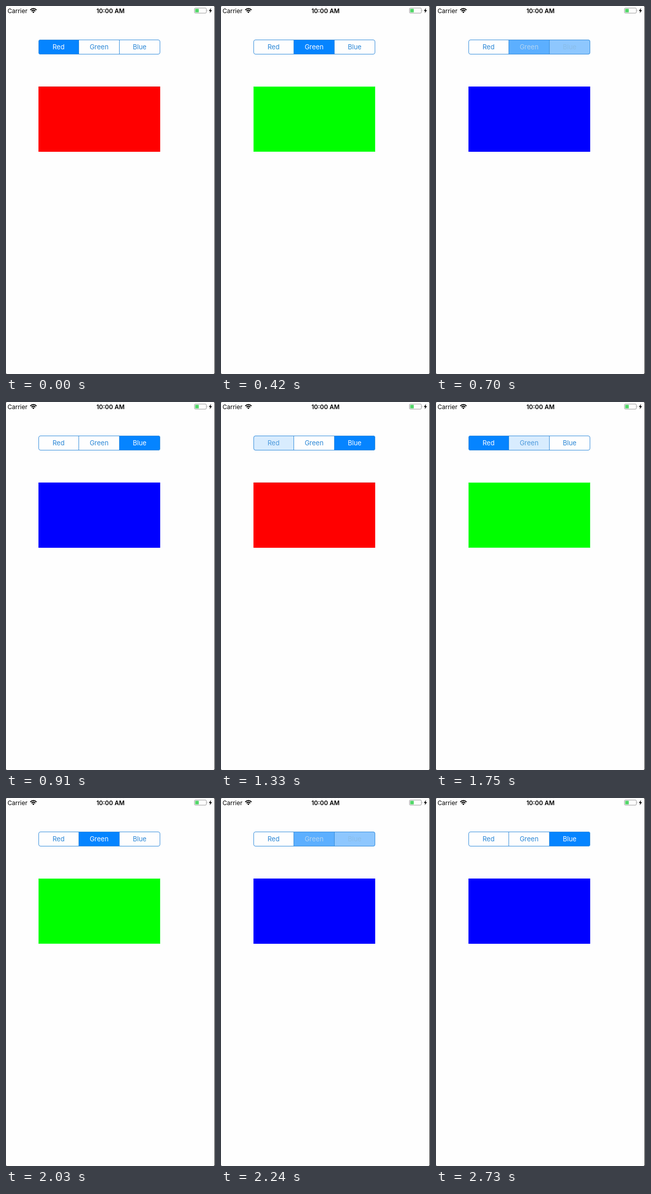
An HTML page that plays this animation: 412x722 px, repeating every 3.01 s.

```html
<!DOCTYPE html>
<html lang="en">
<head>
<meta charset="utf-8">
<title>Segmented control</title>
<style>
  html, body { margin: 0; width: 100%; height: 100%; overflow: hidden; background: #222; }
  svg { display: block; width: 100%; height: 100%; }
  text { font-family: Inter, "Liberation Sans", sans-serif; font-size: 12px; }
  .label { font-size: 13px; text-anchor: middle; }
</style>
</head>
<body>
<svg viewBox="0 0 412 722">
  <clipPath id="rounded"><rect x="64" y="66" width="240" height="29" rx="4"/></clipPath>
  <rect width="411" height="722" rx="2" fill="#fefefe"/>

  <!-- Status bar -->
  <text x="3" y="14">Carrier</text>
  <g fill="none" stroke="#000" stroke-width="2">
    <path d="M47.8 7.7Q54 2.3 60.2 7.7M50.2 10Q54 6.8 57.8 10"/>
  </g>
  <path d="M51.7 11.6Q54 9.8 56.3 11.6L54 14Z"/>
  <text x="206" y="14" text-anchor="middle" font-weight="600">10:00 AM</text>
  <rect x="371.5" y="4" width="23.5" height="10" rx="2" fill="none" stroke="#999"/>
  <path d="M396 7.3q1.6 1.7 0 3.4z" fill="#999"/>
  <rect x="373" y="5.5" width="7" height="7" rx=".6" fill="#53d769"/>
  <path d="M404.3 4L399.8 9.8H402.6L401.5 14L406.2 8.2H403.3Z"/>

  <!-- Segmented control -->
  <g id="segments" clip-path="url(#rounded)"></g>
  <g fill="none" stroke="#368edc">
    <rect x="64.5" y="66.5" width="239" height="28" rx="3.5"/>
    <path d="M143.5 67V94M223.5 67V94"/>
  </g>

  <!-- Color panel -->
  <rect id="panel" x="64" y="158" width="240" height="128"/>
  <path id="edge" fill="none"/>
</svg>
<script>
  const LOOP = 3010, STEP = 70, FADE = 200, PRESSED = 0.15;
  const RED = 0, GREEN = 1, BLUE = 2;
  const panelColors = ['#f00', '#0f0', '#00f'];
  const edges = [
    { d: 'M64 158.5H304', color: '#d80000' },
    { d: 'M64.5 158.5H303.5V285.5H64.5Z', color: '#26ff2e' },
    { d: '', color: 'none' }
  ];
  const taps = [
    { at: 70, to: GREEN }, { at: 560, to: BLUE }, { at: 1260, to: RED },
    { at: 1680, to: GREEN }, { at: 2100, to: BLUE }
  ];

  const segments = document.getElementById('segments');
  const panel = document.getElementById('panel');
  const edge = document.getElementById('edge');

  segments.innerHTML = ['Red', 'Green', 'Blue'].map((name, i) => {
    const left = 64 + 80 * i - (i ? 1 : 0);
    const label = color =>
      `<text class="label" x="${103.5 + 80 * i}" y="85" fill="${color}">${name}</text>`;
    return label('#2b87d6') +
      `<g class="selected"><rect x="${left}" y="66" width="${144 + 80 * i - left}" height="29" fill="#0584ff"/>${label('#fff')}</g>`;
  }).join('');
  const selected = segments.querySelectorAll('.selected');

  function draw(now) {
    const time = Math.floor((now % LOOP) / STEP) * STEP;
    const opacity = [0, 0, 0];
    let current = RED, color = RED;

    for (const { at, to } of taps) {
      if (time < at) break;
      const fade = Math.min(1, Math.max(0, (time - at - STEP) / FADE));
      opacity.fill(0);
      opacity[current] = 1 - fade;
      opacity[to] = PRESSED + (1 - PRESSED) * fade;
      if (time >= at + STEP) color = to;
      current = to;
    }
    if (time < taps[0].at) opacity[RED] = 1;

    selected.forEach((group, i) => group.setAttribute('opacity', opacity[i]));
    panel.setAttribute('fill', panelColors[color]);
    edge.setAttribute('d', edges[color].d);
    edge.setAttribute('stroke', edges[color].color);
  }

  const start = performance.now();
  function tick() {
    draw(performance.now() - start);
    requestAnimationFrame(tick);
  }
  tick();
</script>
</body>
</html>
```
